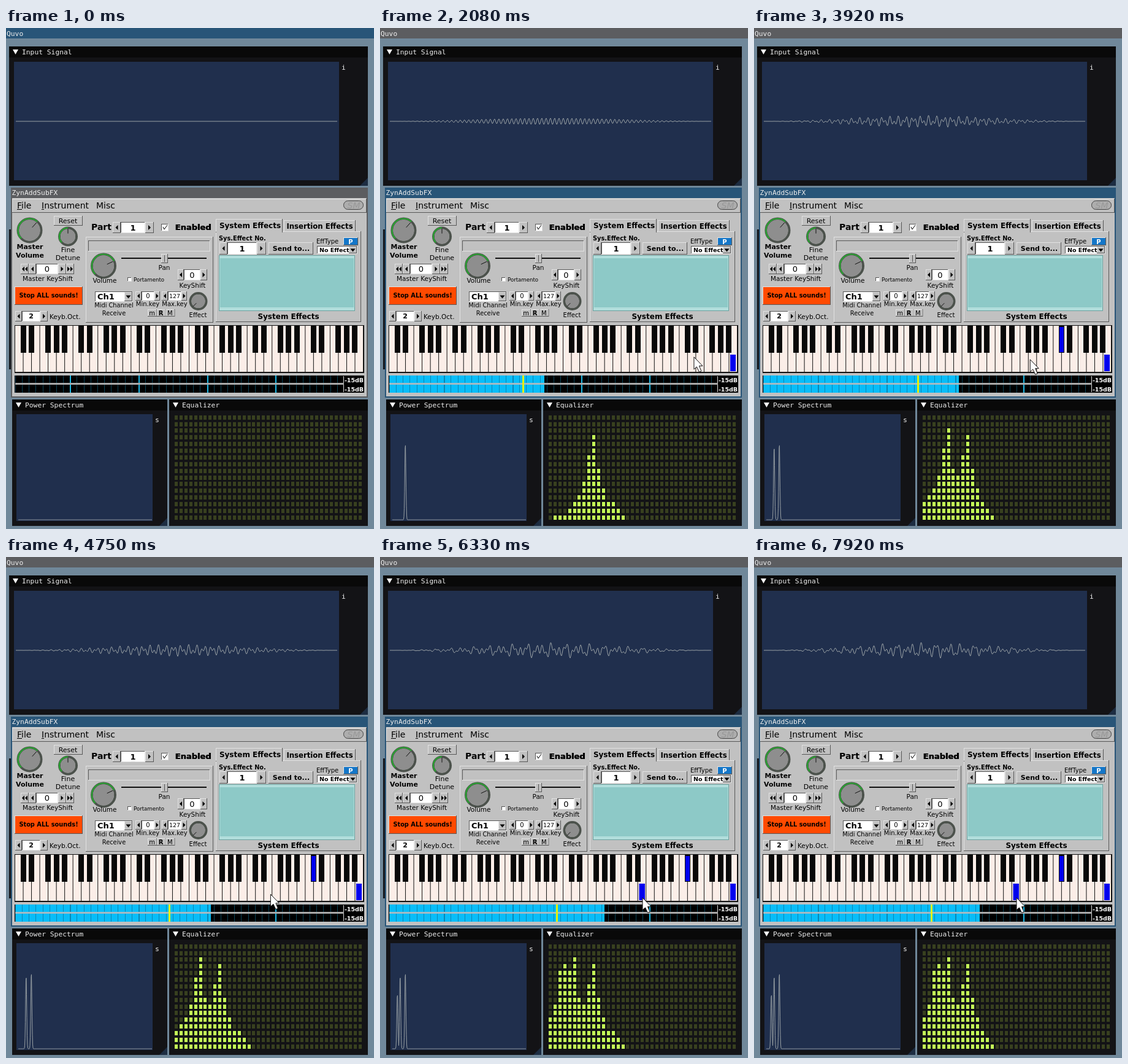
Recreate the animation shown at these times as an HTML page with a canvas. Size 600 px wide and 816 px high, loop 8000 ms.

```html
<!DOCTYPE html>
<html lang="en">
<head>
<meta charset="utf-8">
<title>Synth and spectrum</title>
<style>
  html, body { margin: 0; width: 100%; height: 100%; overflow: hidden; background: #70889a; }
  canvas { display: block; }
</style>
</head>
<body>
<canvas id="stage" width="600" height="816"></canvas>
<script>
const LOOP = 8000, STEP = 1000 / 12;
const MONO = '"DejaVu Sans Mono", monospace', SANS = '"DejaVu Sans", sans-serif';
const FACE = '#c1c1c1', PLOT = '#202f4d', TRACE = '#98a0a4', BLUE = '#0000ee';
const KEY_W = 568 / 42, FOCUS_AT = 250;

const screen = document.getElementById('stage').getContext('2d');
const backdrop = document.createElement('canvas');
backdrop.width = 600;
backdrop.height = 816;
let ctx = backdrop.getContext('2d');

// Each held note: start, wave period and height, spectrum peak, equalizer bars, meter levels.
const notes = [
  { at: 915, period: 7, amp: 5.2, px: 41.3, top: 677, peak: 269, rms: 235,
    bars: [0, 1, 1, 1, 2, 3, 4, 6, 10, 13, 8, 5, 3, 2, 1] },
  { at: 2750, period: 12.5, amp: 4.8, px: 32.8, top: 683, peak: 334, rms: 267.5,
    bars: [3, 4, 5, 7, 11, 14, 8, 7, 5, 4, 3, 2] },
  { at: 6080, period: 21, amp: 4.8, px: 28.3, top: 712, peak: 367, rms: 289.5,
    bars: [5, 7, 12, 13, 12, 8, 6, 5, 4, 3, 2] }
];
const cursorPath = [
  [250, 597, 508], [580, 575, 530], [1580, 574, 531], [2080, 512, 536], [2580, 500, 512],
  [3080, 500, 512], [3920, 450, 540], [4900, 428, 551], [5750, 428, 551], [6000, 428, 555], [8000, 428, 555]
];

function box(x, y, x2, y2, color) {
  ctx.fillStyle = color;
  ctx.fillRect(x, y, x2 - x, y2 - y);
}

function text(str, x, y, size, { bold = false, align = 'center', color = '#000', family = SANS, italic = false } = {}) {
  ctx.font = `${italic ? 'italic ' : ''}${bold ? 'bold ' : ''}${size}px ${family}`;
  ctx.textAlign = align;
  ctx.fillStyle = color;
  ctx.fillText(str, x, y);
}

const mono = (str, x, y) => text(str, x, y, 11.3, { family: MONO, align: 'left', color: '#eee' });

function path(points, color, fill = true) {
  ctx.beginPath();
  points.forEach(([x, y]) => ctx.lineTo(x, y));
  if (fill) { ctx.fillStyle = color; ctx.fill(); }
  else { ctx.strokeStyle = color; ctx.lineWidth = 1; ctx.stroke(); }
}

// Box with light and dark edges; sunken ones swap them.
function bevel(x, y, x2, y2, color = FACE, sunken = false) {
  const light = '#e2e2e2', dark = '#585858';
  box(x, y, x2, y2, sunken ? light : dark);
  box(x, y, x2 - 1, y2 - 1, sunken ? dark : light);
  box(x + 1, y + 1, x2 - 1, y2 - 1, color);
}

function arrow(x, y, dir, s = 4) {
  path([[x - dir * s / 2, y - s], [x + dir * s / 2, y], [x - dir * s / 2, y + s]], '#000');
}

function spinner(x0, x1, x2, x3, y, y2, value, size, bold) {
  const mid = (y + y2) / 2;
  bevel(x0, y, x1, y2);
  bevel(x1, y, x2, y2, '#fff', true);
  bevel(x2, y, x3, y2);
  arrow((x0 + x1) / 2, mid, -1);
  arrow((x2 + x3) / 2, mid, 1);
  text(value, (x1 + x2) / 2, mid + size * .36, size, { bold });
}

function dropdown(x, y, x2, y2, value, size) {
  bevel(x, y, x2, y2, '#fff', true);
  bevel(x2 - 14, y + 1, x2 - 1, y2 - 1);
  const cx = x2 - 7.5, cy = (y + y2) / 2;
  path([[cx - 4, cy - 2], [cx + 4, cy - 2], [cx, cy + 3]], '#000');
  text(value, x + 4, cy + size * .36, size, { bold: true, align: 'left' });
}

function knob(x, y, r, degrees) {
  const up = -Math.PI / 2, turn = degrees * Math.PI / 180;
  const ring = (radius, from, to, color, width) => {
    ctx.beginPath();
    ctx.arc(x, y, radius, from, to);
    ctx.strokeStyle = color;
    ctx.lineWidth = width;
    ctx.stroke();
  };
  ring(r - 2, 0, 7, '#4c524c', 4);
  if (degrees > -130) ring(r - 2, up - 2.35, up + turn, '#2aa632', 2.2);
  ctx.beginPath();
  ctx.arc(x, y, r - 4, 0, 7);
  ctx.fillStyle = '#8e8e8e';
  ctx.fill();
  const s = Math.sin(turn), c = -Math.cos(turn);
  path([[x + s * r * .3, y + c * r * .3], [x + s * r * .8, y + c * r * .8]], '#111', false);
}

function panel(x, y, x2, y2, title) {
  box(x, y, x2, y2, '#131316');
  box(x, y, x2, y + 18, '#090909');
  path([[x + 6, y + 5], [x + 15, y + 5], [x + 10.5, y + 13]], '#fff');
  mono(title, x + 21, y + 13);
}

function plot(x, y, x2, y2, label, grip) {
  box(x, y, x2, y2, PLOT);
  mono(label, x2 + 4, y + 13);
  const [gx, gy] = grip;
  path([[gx, gy - 13], [gx, gy], [gx - 13, gy]], '#1d2d42');
}

function drawSynth() {
  box(10, 277, 588, 600, FACE);
  bevel(10, 278, 588, 301);
  const left = { align: 'left' };
  text('File', 18, 293.5, 14, left);
  text('Instrument', 58, 293.5, 14, left);
  text('Misc', 147, 293.5, 14, left);
  box(18, 295, 26, 296, '#000');
  box(58, 295, 62, 296, '#000');
  ctx.beginPath();
  ctx.roundRect(550.5, 281.5, 32, 14, 7);
  ctx.fillStyle = '#adadad';
  ctx.fill();
  ctx.strokeStyle = '#444';
  ctx.lineWidth = 1;
  ctx.stroke();
  text('SM', 567, 294, 14, { color: '#989898', italic: true });

  knob(38.5, 329.5, 21, 42);
  knob(101, 339.5, 16, 0);
  bevel(78, 306, 125, 322);
  text('Reset', 101, 318, 11);
  text('Master', 39, 360, 11, { bold: true });
  text('Volume', 39, 373.5, 11, { bold: true });
  text('Fine', 101, 365, 11);
  text('Detune', 101, 378, 11);
  bevel(24, 384, 37, 401);
  bevel(98, 384, 111, 401);
  [28, 33].forEach(x => arrow(x, 392.5, -1));
  [102, 107].forEach(x => arrow(x, 392.5, 1));
  spinner(37, 49, 85, 98, 384, 401, '0', 13);
  text('Master KeyShift', 68, 412, 10.5);
  bevel(14, 421, 125, 451, '#ff4a00');
  text('Stop ALL sounds!', 69.5, 439, 9.8, { bold: true });
  spinner(15, 26, 56, 68, 461, 478, '2', 11, true);
  text('Keyb.Oct.', 71, 474, 10.5, left);

  text('Part', 139, 329, 14, { bold: true, align: 'left' });
  spinner(174, 187, 227, 241, 316, 334, '1', 13, true);
  bevel(253, 319, 265, 331, '#fff', true);
  path([[256, 324], [258, 328], [263, 321]], '#000', false);
  text('Enabled', 305, 329, 13, { bold: true });
  text('Enabled', 305.6, 329, 13, { bold: true });
  bevel(130, 340, 338, 480);
  bevel(134, 346, 333, 364, FACE, true);
  knob(159, 387.5, 21, 65);
  text('Volume', 161, 415, 10.5);
  box(188, 374, 327, 376, '#111');
  bevel(253, 368, 264, 383);
  box(258, 370, 259, 381, '#555');
  text('Pan', 258, 394, 10.5);
  bevel(198, 406, 205, 413, '#fff', true);
  text('Portamento', 208, 413, 8.6, left);
  spinner(280, 290, 317, 328, 393, 411, '0', 13);
  text('KeyShift', 304, 423, 10.5);
  dropdown(145, 429, 207, 446, 'Ch1', 13);
  text('Midi Channel', 176, 455, 9.8);
  text('Receive', 176, 468, 9.8);
  spinner(211, 221, 242, 251, 429, 444, '0', 10);
  spinner(254, 264, 286, 295, 429, 444, '127', 9.5);
  text('Min.key', 231, 453, 10);
  text('Max.key', 275, 453, 10);
  ['m', 'R', 'M'].forEach((letter, i) => {
    bevel(231 + i * 14.7, 458, 246 + i * 14.7, 470);
    text(letter, 238 + i * 14.7, 468, 10, { bold: letter === 'R' });
  });
  knob(313.5, 445, 15, -135);
  text('Effect', 313, 471, 10);

  bevel(453, 313, 570, 332);
  bevel(342, 331, 579, 479);
  bevel(342, 311, 451, 333);
  box(343, 330, 450, 334, FACE);
  const bold = { bold: true };
  text('System Effects', 398, 326, 12, bold);
  text('Insertion Effects', 511.5, 327, 11.7, bold);
  text('Sys.Effect No.', 347, 346, 9.8, { bold: true, align: 'left' });
  spinner(348, 361, 409, 424, 349, 369, '1', 13, true);
  bevel(428, 349, 501, 369);
  text('Send to...', 465, 363, 11, bold);
  text('EffType', 506, 351, 10, left);
  bevel(550, 341, 574, 354, '#1476c8');
  text('P', 562, 352, 10, { bold: true, color: '#fff' });
  dropdown(507, 355, 573, 368, 'No Effect', 9.5);
  box(347, 370, 569, 461, '#6ba19f');
  box(348, 371, 568, 460, '#b2dedc');
  box(349, 375, 567, 455, '#8dc9c7');
  text('System Effects', 460.5, 474, 12, bold);

  box(14, 484, 584, 562, '#111');
  for (let i = 0; i < 42; i++) box(15 + i * KEY_W, 485, 14 + (i + 1) * KEY_W, 560, '#fbeee8');
  for (let i = 1; i < 42; i++) if (![0, 3].includes(i % 7)) blackKey(i, '#080808');

  box(14, 566, 584, 594, '#000');
  drawMeterGrid(551, '#0a465a', '#1eb9e6');
  box(551, 566, 584, 594, '#000');
  box(550, 567, 551, 593, '#ddd');
  [577, 591.5].forEach(y => text('-15dB', 567.5, y, 9.5, { bold: true, color: '#fff' }));
  box(15, 578, 551, 581, '#a9a9a9');
}

function blackKey(i, color, inset = 0) {
  const x = Math.round(10 + i * KEY_W);
  box(x + inset, 485 + inset * 2, x + 9 - inset, 529 - inset, color);
}

function drawMeterGrid(right, minor, major) {
  for (let db = 0; db <= 48; db++) {
    const x = Math.round(551 - db * 11.17);
    const isMajor = db % 10 === 0;
    if (x < right) box(x, 566, x + (isMajor ? 2 : 1), 594, isMajor ? major : minor);
  }
}

function drawBackdrop() {
  box(0, 0, 600, 816, '#70889a');
  box(5, 328, 9, 556, '#15181d');
  panel(5, 30, 590, 257, 'Input Signal');
  plot(13, 55, 543, 248, 'i', [590, 257]);
  panel(10, 605, 263, 811, 'Power Spectrum');
  plot(17, 629, 239, 803, 's', [263, 811]);
  panel(266, 605, 590, 811, 'Equalizer');
  drawSynth();
}

function drawTitles(synthFocused) {
  const active = '#285578', idle = '#5c5d60';
  const frame = synthFocused ? active : idle;
  box(0, 0, 600, 17, synthFocused ? idle : active);
  mono('Quvo', 1, 12.5);
  box(8, 260, 590, 277, frame);
  box(8, 277, 10, 602, frame);
  box(588, 277, 590, 602, frame);
  box(8, 600, 590, 602, frame);
  mono('ZynAddSubFX', 9.5, 272);
}

function drawWave(active, t) {
  const points = [];
  for (let x = 16; x <= 540; x++) {
    const windowed = Math.sin(Math.PI * (x - 16) / 524) ** 2;
    const sum = active.reduce((s, n, i) =>
      s + n.amp * Math.sin((x - 278) * 2 * Math.PI / n.period + t * (.031 - i * .009)), 0);
    points.push([x, 152 - windowed * sum]);
  }
  path(points, TRACE, false);
}

function drawSpectrum(active) {
  const points = [];
  for (let x = 20; x <= 238; x += .5) {
    const heights = active.map(n => (801 - n.top) * Math.exp(-(((x - n.px) / 1.3) ** 2)));
    points.push([x, 801 - Math.max(0, ...heights)]);
  }
  path(points, TRACE, false);
}

// The quiet tail of the bars widens by one column while the level dips.
function drawEqualizer(active, wobble) {
  for (let col = 0; col < 39; col++) {
    const source = col > 12 && wobble < 0 ? col - 1 : col;
    const lit = Math.max(0, ...active.map(n => n.bars[source] || 0));
    for (let row = 0; row < 16; row++) {
      const x = Math.round(275 + col * 7.9), y = Math.round(793.8 - row * 10.87);
      box(x, y, x + 5, y + 7, row < lit ? '#c4fb57' : '#38401f');
    }
  }
}

function drawMeter(note, wobble) {
  const peak = Math.round(note.peak + wobble), rms = Math.round(note.rms + wobble);
  box(15, 566, peak, 594, '#08bdf8');
  drawMeterGrid(peak, '#0a86b4', '#0a86b4');
  box(15, 578, peak, 581, '#a3bac4');
  box(rms - 2, 566, rms + 1, 594, '#e2f208');
}

function drawKeys(t) {
  if (t >= 830) box(571, 532, 580, 559, BLUE);
  if (t >= notes[1].at - 85) blackKey(36, BLUE, 1);
  if (t >= notes[2].at - 85) box(422.5, 532, 432, 559, BLUE);
}

function drawCursor(t) {
  if (t < FOCUS_AT) return;
  const i = cursorPath.findIndex(p => p[0] > t);
  const [t0, x0, y0] = cursorPath[i - 1], [t1, x1, y1] = cursorPath[i];
  const u = (t - t0) / (t1 - t0);
  ctx.save();
  ctx.translate(x0 + (x1 - x0) * u, y0 + (y1 - y0) * u);
  const outline = [[0, 0], [0, 20], [4.5, 16], [8.5, 24.5], [12, 23], [8.5, 14.5], [14, 14.5], [0, 0]];
  path(outline, '#fff');
  path(outline, '#111', false);
  ctx.restore();
}

function render(now) {
  const frame = Math.floor((now % LOOP + 4) / STEP) % 96;
  const t = frame * STEP, wobble = Math.sin(frame * 2.2);
  const active = notes.filter(n => t >= n.at);
  ctx.drawImage(backdrop, 0, 0);
  drawTitles(t >= FOCUS_AT - 1);
  drawWave(active, t);
  drawSpectrum(active);
  drawEqualizer(active, wobble);
  if (active.length) drawMeter(active[active.length - 1], wobble);
  drawKeys(t);
  drawCursor(t);
}

drawBackdrop();
ctx = screen;
const start = performance.now();
function tick() {
  render(performance.now() - start);
  requestAnimationFrame(tick);
}
tick();
</script>
</body>
</html>
```
